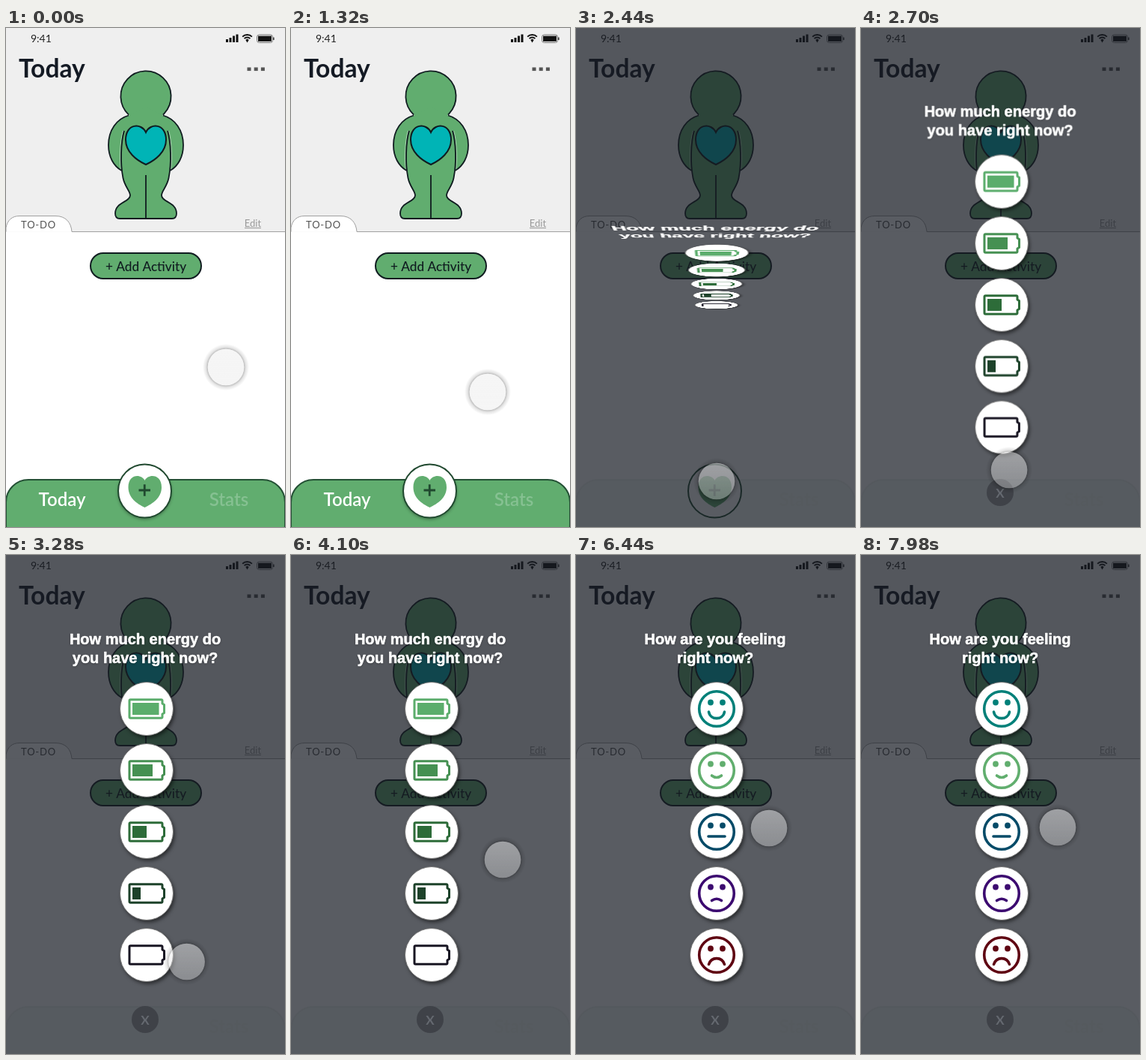
Animation of 373x665 px, one loop 8000 ms. Source, as an HTML page with a canvas:

```html
<!DOCTYPE html>
<html lang="en">
<head>
<meta charset="utf-8">
<title>Check-in screen</title>
<style>
  html, body { margin: 0; width: 100%; height: 100%; overflow: hidden; background: #fff; }
  #stage { position: absolute; left: 0; top: 0; width: 373px; height: 665px; overflow: hidden; perspective: 800px; perspective-origin: 50% 334px; }
  canvas { position: absolute; left: 0; top: 0; width: 373px; height: 665px; }
  #menu { transform-origin: 50% 334px; }
</style>
</head>
<body>
<div id="stage">
  <canvas id="screen"></canvas>
  <canvas id="menu"></canvas>
  <canvas id="pointer"></canvas>
</div>
<script>
const W = 373, H = 665, LOOP = 8000, CX = 187;
const GREEN = '#61ad6f', INK = '#101c20', FOREST = '#20492f';
const LATO = 'Lato, sans-serif', ARIAL = '"Liberation Sans", Arial, sans-serif';
const ratio = window.devicePixelRatio || 1;

const layer = id => {
  const canvas = document.getElementById(id);
  canvas.width = Math.round(W * ratio);
  canvas.height = Math.round(H * ratio);
  const c = canvas.getContext('2d');
  c.scale(ratio, ratio);
  return c;
};
const screen = layer('screen'), menu = layer('menu'), pointer = layer('pointer');

const clamp = v => Math.max(0, Math.min(1, v));
const span = (t, from, to) => clamp((t - from) / (to - from));
const easeInOut = p => p < .5 ? 4 * p ** 3 : 1 - 4 * (1 - p) ** 3;
const smooth = p => p * p * (3 - 2 * p);

function paint(c, path, fill, stroke, width = 2) {
  if (fill) { c.fillStyle = fill; c.fill(path); }
  if (stroke) { c.strokeStyle = stroke; c.lineWidth = width; c.stroke(path); }
}

function disc(x, y, r) {
  const p = new Path2D();
  p.arc(x, y, r, 0, Math.PI * 2);
  return p;
}

function label(c, text, x, y, font, color, align = 'center', spacing = 0) {
  c.font = font;
  c.fillStyle = color;
  c.textAlign = align;
  c.letterSpacing = spacing + 'px';
  c.fillText(text, x, y);
  c.letterSpacing = '0px';
}

function mirrored(c, draw) {
  for (const side of [1, -1]) {
    c.save();
    c.translate(CX, 0);
    c.scale(side, 1);
    c.translate(-CX, 0);
    draw();
    c.restore();
  }
}

// Figure
const arm = new Path2D('M164 116.5C148 121 137 136 137 156C137 172 144 184 154.5 190');
const armFill = new Path2D('M187 105L164 116.5C148 121 137 136 137 156C137 172 144 184 154.5 190L187 190Z');
const flank = 'M158 137C153.500 152 152.500 180 156.500 200C159 212 166 217 166 223C166 232 146 232 146 247Q146 254 152 254L187 254';
const side = new Path2D(flank);
const sideFill = new Path2D(flank + 'L187 137Z');
const chestHeart = new Path2D('M187 139C181 126 160 127 160 149C160 165 174 176 187 182C200 176 214 165 214 149C214 127 193 126 187 139Z');
const buttonHeart = new Path2D('M185.500 603C181 594 163.500 594 163.500 612C163.500 626 175 634 185.500 639C196 634 208 626 208 612C208 594 190 594 185.500 603Z');

function drawFigure(c) {
  c.fillStyle = GREEN;
  c.fill(disc(CX, 91, 33.6));
  mirrored(c, () => { c.fill(armFill); c.fill(sideFill); });
  c.fillRect(CX - 12, 110, 24, 140);
  mirrored(c, () => {
    c.save();
    c.translate(-1.6, 0);
    paint(c, side, null, 'rgba(255,255,255,.45)', 1);
    c.restore();
    paint(c, arm, null, INK, 1.8);
    paint(c, side, null, INK, 1.8);
  });
  const head = new Path2D();
  head.arc(CX, 91, 33.6, 2.32, Math.PI * 2 + .82);
  paint(c, head, null, INK, 1.8);
  paint(c, new Path2D('M187 196V254'), null, INK, 1.8);
  paint(c, chestHeart, '#00b4b6', INK, 2);
}

function drawStatus(c) {
  label(c, '9:41', 33, 19, '14px ' + LATO, '#222', 'left');
  c.fillStyle = '#111';
  [4, 6, 8.5, 10.5].forEach((h, i) => c.fillRect(294 + i * 4.5, 19 - h, 3, h));
  c.strokeStyle = '#111';
  c.lineWidth = 2;
  for (const r of [5.5, 9]) {
    c.beginPath();
    c.arc(322.5, 18, r, -Math.PI * .75, -Math.PI * .25);
    c.stroke();
  }
  c.beginPath();
  c.moveTo(322.5, 19.5);
  c.arc(322.5, 18, 3, -Math.PI * .75, -Math.PI * .25);
  c.fill();
  const cell = new Path2D();
  cell.roundRect(335.5, 9, 21, 10.5, 3);
  paint(c, cell, null, '#777', 1);
  c.fillRect(337, 10.6, 18, 7.3);
  c.fillRect(357.3, 12.5, 1.2, 3.5);
}

function drawPage(c) {
  c.fillStyle = '#fff';
  c.fillRect(0, 0, W, H);
  c.fillStyle = '#efefef';
  c.fillRect(0, 0, W, 271.5);
  drawStatus(c);
  label(c, 'Today', 17, 66, 'bold 33.6px ' + LATO, '#141a24', 'left');
  c.fillStyle = '#555';
  for (let i = 0; i < 3; i++) c.fillRect(322.5 + i * 9.2, 52.5, 5, 4.6);

  const tab = new Path2D('M0 271.5V266C2 256 8 250.500 18 250.500H66C80 250.500 87 259 88 271.5');
  paint(c, tab, '#fff', '#a0a0a0', 1);
  paint(c, new Path2D('M88 271.5H373'), null, '#a0a0a0', 1);
  label(c, 'TO-DO', 43.5, 267, '13px ' + LATO, '#555', 'center', .8);
  label(c, 'Edit', 330, 264.5, '13px ' + LATO, '#999');
  c.fillStyle = '#999';
  c.fillRect(319, 266, 22, 1);

  drawFigure(c);
  const pill = new Path2D();
  pill.roundRect(113, 300, 148, 34, 17);
  paint(c, pill, GREEN, INK);
  label(c, '+ Add Activity', CX, 323.5, '500 17.2px ' + LATO, INK);
}

function drawNav(c) {
  const bar = new Path2D();
  bar.roundRect(0, 602, W, 90, 30);
  paint(c, bar, GREEN, '#245035');
  label(c, 'Today', 75, 637, '600 24px ' + LATO, '#fff');
  label(c, 'Stats', 298, 637, '600 24px ' + LATO, '#86c192');
}

function drawButton(c, face) {
  const ring = disc(185.5, 617, 35.5);
  c.save();
  if (face > .5) {
    c.shadowColor = 'rgba(0,0,0,.4)';
    c.shadowBlur = 4 * ratio;
    c.shadowOffsetY = 2 * ratio;
  }
  paint(c, ring, '#fff');
  c.restore();
  paint(c, ring, null, FOREST, 2);
  paint(c, buttonHeart, GREEN);
  paint(c, new Path2D('M177.500 616H193M185.250 608.250V623.750'), null, FOREST, 2.8);
}

function drawScreen(t) {
  const c = screen;
  const dim = smooth(span(t, 2260, 2430));
  drawPage(c);
  c.globalAlpha = 1 - .95 * dim;
  drawNav(c);
  c.globalAlpha = 1 - span(t, 2440, 2580);
  if (c.globalAlpha > 0) drawButton(c, 1 - dim);
  c.globalAlpha = 1;
  c.fillStyle = `rgba(23,27,36,${.715 * dim})`;
  c.fillRect(0, 0, W, H);
  c.globalAlpha = span(t, 2480, 2640);
  if (c.globalAlpha > 0) {
    paint(c, disc(186, 619, 18), '#3f4248');
    label(c, 'X', 186, 625.5, 'bold 17px ' + LATO, '#656970');
  }
  c.globalAlpha = 1;
}

// Menu
const CELLS = [['#5bad6c', 35.5], ['#459052', 27], ['#2d6c39', 19], ['#1d422a', 11], ['#191623', 0]];
const FACES = [['#008079', 'big'], ['#61ae6e', 'small'], ['#064b68', 'flat'], ['#3c0a70', 'sad'], ['#5f0512', 'frown']];
const MOUTHS = {
  big: 'M-10.500 4C-8.500 15.500 8.500 15.500 10.500 4',
  small: 'M-6.500 7Q0 12 6.500 7',
  flat: 'M-11 6H11',
  sad: 'M-6.500 9.500Q0 5 6.500 9.500',
  frown: 'M-10.500 12.500C-7 2 7 2 10.500 12.500'
};
const shell = new Path2D('M-21.500 -12.300H19.500Q21 -12.300 21 -10.800V-7L23.500 -5.500V5.500L21 7V10.800Q21 12.300 19.500 12.300H-21.500Q-23 12.300 -23 10.800V-10.800Q-23 -12.300 -21.500 -12.300Z');

function drawCell(c, [color, level]) {
  paint(c, shell, null, color, 3);
  c.fillStyle = color;
  c.fillRect(-19, -8, level, 16);
}

function drawFace(c, [color, mood]) {
  paint(c, disc(0, 0, 23.3), null, color, 3.6);
  paint(c, disc(-8, -8.5, 3.9), color);
  paint(c, disc(8, -8.5, 3.9), color);
  paint(c, new Path2D(MOUTHS[mood]), null, color, 3.6);
}

function heading(c, lines) {
  c.save();
  c.strokeStyle = '#fff';
  c.lineWidth = .6;
  lines.forEach((s, i) => {
    const y = 118.8 + i * 25;
    c.shadowColor = 'rgba(0,0,0,.35)';
    c.shadowBlur = 3 * ratio;
    c.shadowOffsetY = ratio;
    label(c, s, 186, y, 'bold 20px ' + ARIAL, '#fff');
    c.shadowColor = 'transparent';
    c.strokeText(s, 186, y);
  });
  c.restore();
}

function drawMenu(t) {
  const c = menu, swap = smooth(span(t, 5700, 6000));
  const turn = easeInOut(span(t, 2282, 2766));
  c.canvas.style.visibility = turn > 0 ? 'visible' : 'hidden';
  c.canvas.style.transform = turn < 1 ? `rotateX(${-90 * (1 - turn)}deg)` : 'none';
  if (!turn) return;
  c.clearRect(0, 0, W, H);
  c.lineCap = c.lineJoin = 'round';
  const pages = [
    [1 - swap, ['How much energy do', 'you have right now?'], CELLS, drawCell],
    [swap, ['How are you feeling', 'right now?'], FACES, drawFace]
  ];
  for (let i = 0; i < 5; i++) {
    const plate = disc(188, 205 + 82 * i, 35.5);
    c.save();
    c.shadowColor = 'rgba(0,0,0,.55)';
    c.shadowBlur = 5 * ratio;
    c.shadowOffsetX = 2 * ratio;
    c.shadowOffsetY = 3 * ratio;
    paint(c, plate, '#fff');
    c.restore();
    paint(c, plate, null, '#777', 1);
  }
  for (const [alpha, lines, items, draw] of pages) {
    if (!alpha) continue;
    c.globalAlpha = alpha;
    heading(c, lines);
    items.forEach((item, i) => {
      c.save();
      c.translate(188, 205 + 82 * i);
      draw(c, item);
      c.restore();
    });
  }
  c.globalAlpha = 1;
}

// Pointer: time, x, y
const PATH = [
  [0, 294, 452], [700, 286, 460], [1320, 263, 485], [1700, 226, 540], [2150, 188, 604],
  [2440, 188, 604], [2700, 198, 589], [3300, 243, 540], [3700, 273, 475], [4100, 283, 406],
  [4340, 284, 401], [4820, 284, 401], [5130, 240, 379], [5400, 195, 370], [5680, 192, 369],
  [6440, 258, 364], [7980, 263, 363]
];

// Monotone cubic interpolation, so rests stay at rest
function along(t, k) {
  const last = PATH.length - 1;
  if (t >= PATH[last][0]) return PATH[last][k];
  const slope = i => (PATH[i + 1][k] - PATH[i][k]) / (PATH[i + 1][0] - PATH[i][0]);
  const tangent = i => {
    if (i === 0) return slope(0);
    if (i === last) return 0;
    const a = slope(i - 1), b = slope(i);
    return a * b <= 0 ? 0 : 2 * a * b / (a + b);
  };
  let i = 0;
  while (t >= PATH[i + 1][0]) i++;
  const d = PATH[i + 1][0] - PATH[i][0], u = (t - PATH[i][0]) / d, v = 1 - u;
  return PATH[i][k] * v * v * (1 + 2 * u) + PATH[i + 1][k] * u * u * (3 - 2 * u)
    + d * u * v * (tangent(i) * v - tangent(i + 1) * u);
}

function drawPointer(t) {
  const c = pointer;
  c.clearRect(0, 0, W, H);
  c.save();
  c.translate(along(t, 1), along(t, 2));
  const glow = c.createRadialGradient(0, 0, 24, 0, 0, 31);
  glow.addColorStop(0, 'rgba(0,0,0,.27)');
  glow.addColorStop(.4, 'rgba(0,0,0,.1)');
  glow.addColorStop(1, 'rgba(0,0,0,0)');
  const halo = disc(0, 0, 31);
  halo.arc(0, 0, 24.3, 0, Math.PI * 2, true);
  c.fillStyle = glow;
  c.fill(halo, 'evenodd');
  const body = c.createLinearGradient(0, -24, 0, 24);
  body.addColorStop(0, 'rgba(236,236,236,.48)');
  body.addColorStop(1, 'rgba(228,228,228,.36)');
  paint(c, disc(0, 0, 24.3), body);
  c.restore();
}

function frame(now) {
  const t = now % LOOP;
  drawScreen(t);
  drawMenu(t);
  drawPointer(t);
  requestAnimationFrame(frame);
}
requestAnimationFrame(frame);
</script>
</body>
</html>
```
